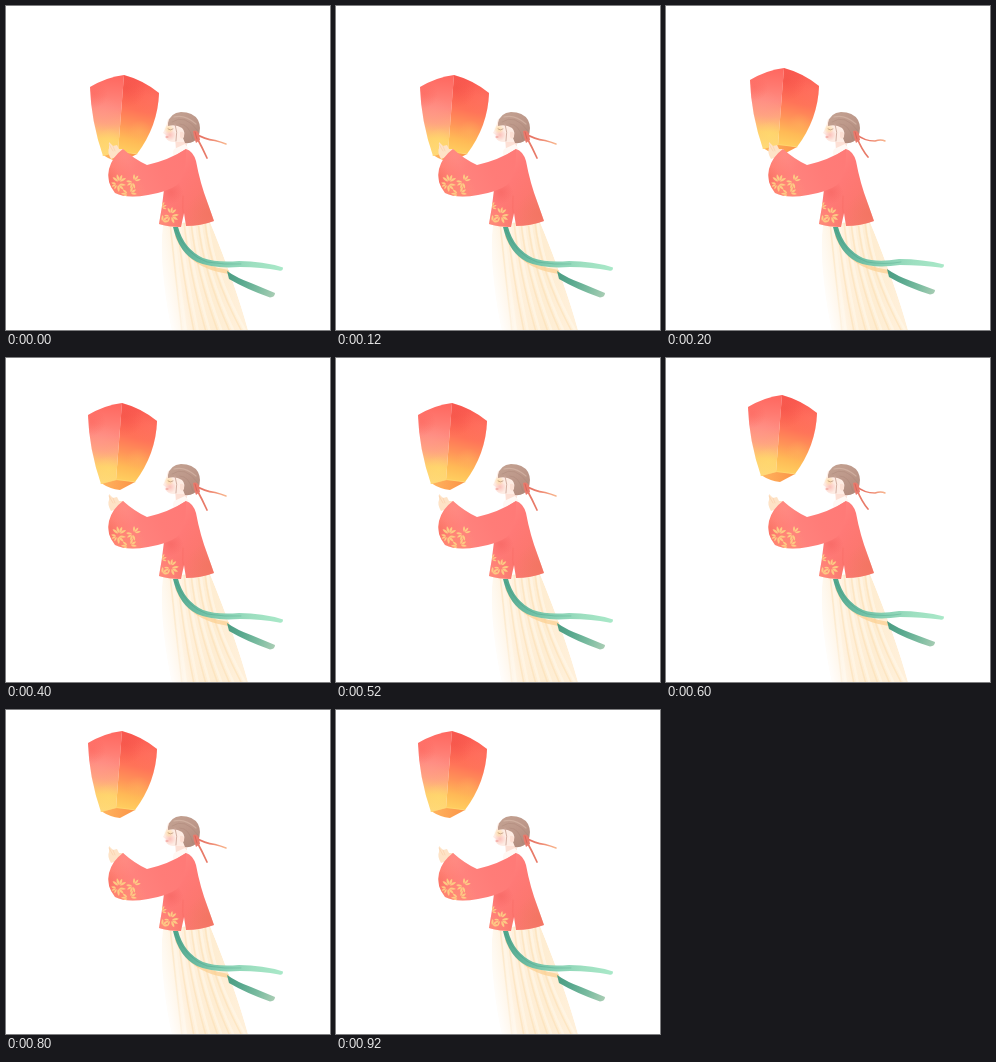
Recreate the animation shown at these times as an HTML page with a canvas. Size 324 by 324 pixels, loop 1 s.

```html
<!DOCTYPE html>
<html lang="en">
<head>
<meta charset="utf-8">
<title>Sky lantern</title>
<style>
html, body { margin: 0; width: 100%; height: 100%; overflow: hidden; background: #fff; }
canvas { display: block; width: 324px; height: 324px; }
</style>
</head>
<body>
<canvas id="stage" width="324" height="324"></canvas>
<script>
const ctx = document.getElementById('stage').getContext('2d');
const STEP = 200;
const LIFT = [[0, 0], [0, -7], [-2, -24], [-2, -32], [-2, -48]];

function grad(x0, y0, x1, y1, ...colors) {
  const g = ctx.createLinearGradient(x0, y0, x1, y1);
  colors.forEach((c, i) => g.addColorStop(i / (colors.length - 1), c));
  return g;
}

function fill(d, style) {
  ctx.fillStyle = style;
  ctx.fill(new Path2D(d));
}

function line(d, style, width = 1) {
  ctx.strokeStyle = style;
  ctx.lineWidth = width;
  ctx.stroke(new Path2D(d));
}

function glow(x, y, r, rgb, alpha) {
  const g = ctx.createRadialGradient(x, y, 0, x, y, r);
  g.addColorStop(0, `rgba(${rgb},${alpha})`);
  g.addColorStop(1, `rgba(${rgb},0)`);
  ctx.fillStyle = g;
  ctx.fillRect(x - r, y - r, 2 * r, 2 * r);
}

function clipped(d, draw) {
  ctx.save();
  ctx.clip(new Path2D(d));
  draw();
  ctx.restore();
}

// A fan of slim pointed leaves around a point
function leaves(x, y, size, turn, count = 4) {
  ctx.fillStyle = '#fdca84';
  for (let i = 0; i < count; i++) {
    ctx.save();
    ctx.translate(x, y);
    ctx.rotate(turn + (i - (count - 1) / 2) * 0.66);
    ctx.beginPath();
    ctx.moveTo(1, 0);
    ctx.quadraticCurveTo(size * 0.55, -size * 0.3, size, 0);
    ctx.quadraticCurveTo(size * 0.55, size * 0.3, 1, 0);
    ctx.fill();
    ctx.restore();
  }
}

function lantern([dx, dy]) {
  ctx.save();
  ctx.translate(dx, dy);
  const left = 'M84 81Q101 71 118 69L112 146L97 150Q85 115 84 81Z';
  const right = 'M118 69Q137 74 153 87Q152 120 131 148L112 146Z';
  fill('M97 149L113 145L131 148L116 156Q106 155 97 149Z', grad(97, 0, 131, 0, '#ffb45e', '#fb9448'));
  fill(left, grad(108, 70, 101, 149, '#ff6860', '#ff786f', '#ff8b80', '#ffa67e', '#ffd06c', '#ffd978'));
  fill(right, grad(134, 74, 119, 148, '#fb5b52', '#ff6656', '#ff7358', '#ff9258', '#ffb956', '#ffd060'));
  clipped(left, () => {
    glow(97, 108, 18, '255,152,142', 0.4);
    glow(104, 136, 14, '255,222,112', 0.4);
    glow(88, 88, 14, '252,94,86', 0.4);
  });
  clipped(right, () => {
    glow(147, 92, 20, '255,124,104', 0.4);
    glow(120, 82, 20, '236,72,64', 0.4);
    glow(134, 126, 12, '255,180,92', 0.4);
  });
  line('M97 149.5L113 145.5L131 148', 'rgba(255,218,120,.7)', 0.8);
  ctx.restore();
}

function skirt() {
  const shape = 'M157 217Q154 244 158 276Q161 302 166 324H242Q229 277 204 216Z';
  clipped(shape, () => {
    fill(shape, grad(155, 0, 235, 0, '#fff7ea', '#fff0db', '#feedd2', '#fff0da'));
    // Pleats spread out from the waist
    for (let i = 0; i < 6; i++) {
      const x = 164 + i * 7, foot = 176 + i * 12;
      line(`M${x} 216Q${x + 5} 266 ${foot} 326`, 'rgba(251,221,175,.5)', 1.6);
      line(`M${x + 2.5} 216Q${x + 8} 266 ${foot + 4} 326`, 'rgba(255,248,236,.6)', 2.4);
    }
    line('M171 230Q184 261 223 266', 'rgba(252,205,138,.65)', 4);
    ctx.fillStyle = grad(153, 285, 177, 279, '#fff', 'rgba(255,255,255,0)');
    ctx.fillRect(150, 216, 60, 110);
  });
}

function sashes(up) {
  const [x, y] = up ? [278, 260.5] : [277, 263.5];
  const bend = up ? 253 : 255;
  fill(`M167 221H172Q178 243 197 252Q211 257 233 ${bend}Q257 ${bend} ${x} ${y - 2}` +
    `Q${x} ${y + 2} ${x - 4} ${y + 1}Q256 ${bend + 6} 234 ${bend + 6}` +
    `Q207 263 191 256Q173 247 167 221Z`,
    grad(168, 222, 276, 262, '#4fa58b', '#66b89f', '#84cfb2', '#9ddfc0', '#a9e8c8'));
  line(`M170 224Q180 249 201 256Q219 259 235 ${bend + 3}`, 'rgba(50,140,116,.25)', 1);

  const end = up ? 287 : 290;
  const mid = up ? 275 : 277;
  fill(`M221 ${mid - 12}Q231 ${mid - 5} 245 ${mid}L269 ${end - 3}` +
    `Q269 ${end + 1} 264 ${end + 1.5}Q240 ${mid + 6} 223 ${mid - 4}Z`,
    grad(221, 267, 269, 289, '#4b9c82', '#5aa98f', '#7bbca0', '#a9cdb4'));
}

function hand() {
  fill('M118 143L113 150L105 153Q101 146 103 142L103 136L107 140L111 139L113 143Z', '#fee3c6');
  line('M103 138L107 145M107 140L109 145', '#fbd0ac', 0.7);
}

function jacket() {
  const body = 'M180 143Q187 145 190 155Q194 177 202 198L208 215Q195 220 180 220L178 207' +
    'L175 221Q162 221 153 218Q156 202 158 184L161 155Z';
  const sleeve = 'M180 143Q163 154 141 159Q128 153 117 143Q106 151 103 163' +
    'Q100 176 109 187Q121 193 142 189Q161 186 171 179Q181 168 180 143Z';
  fill(body, grad(157, 170, 204, 200, '#ff837f', '#ff7976', '#fd7770', '#f77a6c'));
  clipped(body, () => {
    glow(204, 208, 24, '240,112,90', 0.5);
    glow(157, 216, 20, '255,160,128', 0.45);
    glow(165, 186, 12, '242,94,90', 0.5);
    line('M177 190Q176 202 178 214', 'rgba(240,92,88,.3)', 1);
  });
  fill(sleeve, grad(177, 151, 108, 185, '#ff7a77', '#ff7c78', '#ff827d', '#ff7f70'));
  clipped(sleeve, () => {
    glow(102, 172, 12, '244,100,88', 0.45);
    glow(118, 149, 18, '255,150,138', 0.4);
    glow(121, 189, 20, '255,158,118', 0.35);
    leaves(113, 176, 8, -1.5);
    leaves(112, 178, 8, 0.8, 3);
    leaves(111, 178, 6, 2.7, 3);
    leaves(128, 175, 7, -0.9, 3);
    leaves(127, 176, 7, 2.3, 4);
    leaves(124, 187, 7, -0.5, 3);
    leaves(122, 188, 7, 3.2, 3);
  });
  clipped(body, () => {
    leaves(155, 201, 6, -0.3, 3);
    leaves(165, 208, 7, -1.4, 3);
    leaves(165, 210, 8, 0.5, 3);
    leaves(164, 210, 6, 2.6, 3);
    leaves(156, 216, 7, -0.8, 3);
  });
}

function head(up) {
  fill('M169 130L180 131L181 140L170 145Z', '#fde0d5');
  fill('M162 113L160 121L157 127L160 129L160 132Q162 136 168 136L179 136L181 122L174 111Z', '#feece4');
  glow(164, 129, 6, '250,165,158', 0.6);
  glow(163, 123, 5, '255,214,130', 0.6);
  fill('M168 143L179 138L183 143L168 151Q166 147 168 143Z', '#fff8f4');

  const hair = 'M162 117Q164 107 175 106Q187 106 192 114Q196 122 192 131Q188 138 179 137' +
    'L177 132Q180 126 176 122Q170 118 162 120Z';
  fill(hair, grad(166, 106, 187, 136, '#c3a292', '#bd988a', '#b08a7c'));
  clipped(hair, () => {
    line('M166 116Q179 107 192 125M174 118Q183 118 187 133', 'rgba(155,117,104,.3)', 0.8);
    line('M168 111Q179 108 190 118', 'rgba(226,198,182,.45)', 1.2);
  });
  fill('M174 126Q179 125 178 131Q176 134 174 131Z', '#fddfd3');
  line('M162 123Q164 125 167 123', '#b48d78', 0.7);
  line('M160 131L162 131', '#ee8f8a', 1);
  line('M169 118Q172 126 170 135', '#cfa99b', 0.9);

  // Hair ties
  const [x, y] = up ? [219, 135] : [220, 138];
  const [lx, ly] = up ? [202, 151] : [201, 152];
  line(`M190 128Q198 ${up ? 135 : 133} 209 ${up ? 135 : 134.5}Q215 ${y - 2} ${x} ${y}`,
    grad(190, 0, 220, 0, '#e26a5e', '#ee8670', '#f8b890'), 1.6);
  line(`M191 132Q196 ${up ? 144 : 141} ${lx} ${ly}`, '#e87a68', 1.7);
  fill('M187 125Q191 123 193 128L194 134L190 137L188 131Z', '#ea7a6c');
  line('M189 126L191 133', '#cf6258', 0.8);
}

function draw(now) {
  const pose = Math.floor(now % (STEP * LIFT.length) / STEP);
  const up = pose % 2 === 1;
  ctx.fillStyle = '#fff';
  ctx.fillRect(0, 0, 324, 324);
  ctx.lineCap = ctx.lineJoin = 'round';
  lantern(LIFT[pose]);
  skirt();
  sashes(up);
  hand();
  head(up);
  jacket();
}

const start = performance.now();
function tick() {
  draw(performance.now() - start);
  requestAnimationFrame(tick);
}
tick();
</script>
</body>
</html>
```
